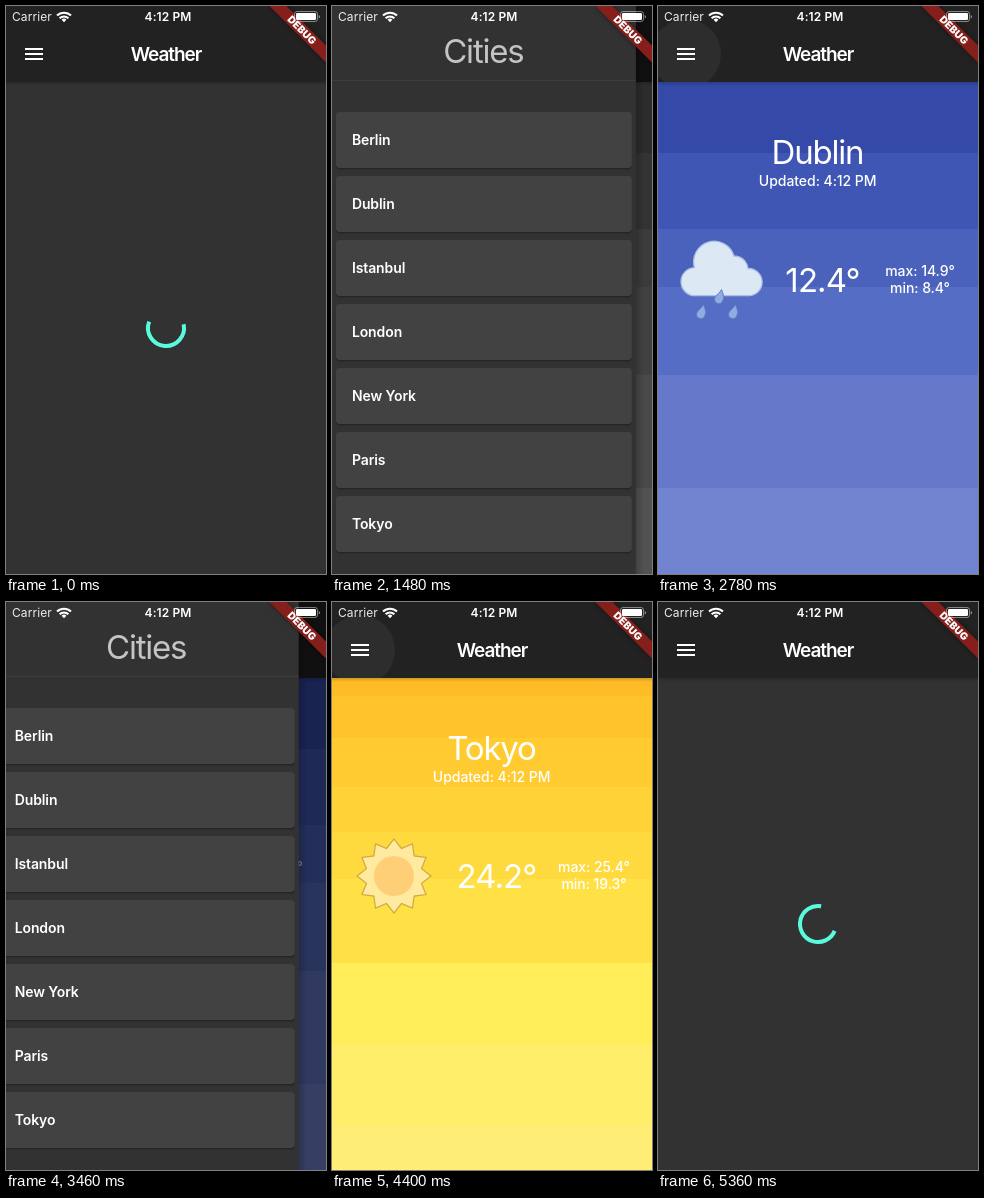
An HTML page that plays this animation: 320 px wide and 568 px high, repeating every 5.38 s.

```html
<!DOCTYPE html>
<html lang="en">
<head>
<meta charset="utf-8">
<title>Weather</title>
<style>
  html, body { margin: 0; width: 100%; height: 100%; overflow: hidden; background: #303030; }
  svg { display: block; width: 100%; height: 100%; }
  text { font-family: Inter, "Liberation Sans", sans-serif; fill: #fff; }
  .mid { text-anchor: middle; }
  .status { font-size: 12px; letter-spacing: .1px; }
  .title { font-size: 19px; font-weight: 600; letter-spacing: -1.05px; }
  .big { font-size: 33px; letter-spacing: -1.2px; }
  .temp { font-size: 33px; letter-spacing: -.9px; }
  .small { font-size: 14px; font-weight: 500; letter-spacing: -.05px; }
  .row { font-size: 14px; font-weight: 600; letter-spacing: -.1px; }
  .debug { font-size: 10.2px; font-weight: 900; }
</style>
</head>
<body>
<svg id="stage" viewBox="0 0 320 568" xmlns="http://www.w3.org/2000/svg">
  <defs>
    <linearGradient id="barShade" x2="0" y2="1">
      <stop stop-color="#000" stop-opacity=".18"/>
      <stop offset="1" stop-color="#000" stop-opacity="0"/>
    </linearGradient>
    <linearGradient id="drawerShade">
      <stop stop-color="#000" stop-opacity=".2"/>
      <stop offset="1" stop-color="#000" stop-opacity="0"/>
    </linearGradient>
    <clipPath id="barClip"><rect width="320" height="76"/></clipPath>
    <filter id="blur" x="-20%" y="-80%" width="140%" height="260%">
      <feGaussianBlur stdDeviation="2.5"/>
    </filter>
  </defs>

  <rect width="320" height="568" fill="#323232"/>
  <g id="views"></g>
  <path id="spinner" fill="none" stroke="#5afade" stroke-width="4"/>

  <rect y="76" width="320" height="4" fill="url(#barShade)"/>
  <rect width="320" height="76" fill="#222"/>
  <circle id="splash" cx="28" cy="48" r="35" fill="#fff" fill-opacity=".05" clip-path="url(#barClip)"/>
  <path d="M19 42h18v2h-18zM19 47h18v2h-18zM19 52h18v2h-18z" fill="#fff"/>
  <text class="title mid" x="160" y="55">Weather</text>

  <rect id="scrim" width="320" height="568"/>
  <g id="drawer">
    <rect x="304" width="8" height="568" fill="url(#drawerShade)"/>
    <rect width="304" height="568" fill="#323232"/>
    <rect y="74" width="304" height="1" fill="#3e3e3e"/>
    <text class="big mid" x="151.5" y="57" style="fill:#c4c4c4">Cities</text>
    <g id="rows"></g>
  </g>

  <g transform="translate(320 0) rotate(45)">
    <rect x="-40" y="28" width="80" height="12" opacity=".4" filter="url(#blur)"/>
    <rect x="-44" y="28" width="88" height="12" fill="#861f1c"/>
    <text class="debug mid" y="37.7">DEBUG</text>
  </g>

  <text class="status" x="6" y="15" style="fill:#ececec">Carrier</text>
  <g fill="none" stroke="#fff" stroke-width="2">
    <path d="M51 9.5a10 10 0 0 1 14 0M53.6 12.3a6.2 6.2 0 0 1 8.8 0"/>
    <path d="M58 16.2l-2.4-2.4a3.4 3.4 0 0 1 4.8 0z" fill="#fff" stroke="none"/>
  </g>
  <text class="status mid" x="162" y="15" style="font-weight:600">4:12 PM</text>
  <rect x="288.5" y="5.5" width="23" height="10" rx="2.5" fill="none" stroke="#fff" stroke-opacity=".45"/>
  <rect x="290" y="7" width="20" height="7" rx="1.2" fill="#fff"/>
  <path d="M312.7 9v3.4q1.4-.5 1.4-1.7t-1.4-1.7z" fill="#fff" opacity=".5"/>
</svg>

<script>
const LOOP = 5380, STEP = 20;
const DRAWER_W = 304;
const $ = id => document.getElementById(id);

const cities = ["Berlin", "Dublin", "Istanbul", "London", "New York", "Paris", "Tokyo"];

const cloud = `<path d="M37.5 289.7A14 14 0 0 1 36.5 261.7A20.3 20.3 0 0 1 76 250
  A14 14 0 0 1 90 262.5A13.6 13.6 0 0 1 91 289.7Z" fill="#dde8f5" stroke="#abc1e3" stroke-width="1.3"/>`;

const drop = (x, y) => `<path transform="translate(${x} ${y})" fill="#8fabe2" stroke="#5b7cc4"
  d="M2.5-7C5-1 5 2 4 3.6A4.3 4.3 0 1 1-3.4 0C-2-2 1-4 2.5-7Z"/>`;

function sun() {
  const spikes = 12;
  const points = Array.from({ length: spikes * 2 }, (_, i) => {
    const a = i * Math.PI / spikes, r = i % 2 ? 28.5 : 37;
    return `${(62 + r * Math.sin(a)).toFixed(2)},${(274 - r * Math.cos(a)).toFixed(2)}`;
  });
  return `<polygon points="${points.join(" ")}" fill="#ffeaa0" stroke="#cfa843" stroke-width="1.2"/>
    <circle cx="62" cy="274" r="20" fill="#ffcf78"/>`;
}

// Bands are [top, colour]; each runs down to the next one.
const reports = [
  {
    from: 380, to: 1600, city: "London", temp: "11.6°", max: "13.2°", min: "8.1°", icon: cloud,
    bands: [[76, "#616161"], [147, "#707070"], [223, "#808080"], [281, "#8f8f8f"],
            [369, "#a0a0a0"], [482, "#b4b4b4"]]
  },
  {
    from: 2380, to: 3540, city: "Dublin", temp: "12.4°", max: "14.9°", min: "8.4°",
    icon: cloud + drop(61, 290.5) + drop(43, 305.5) + drop(75, 305.5),
    bands: [[76, "#3449a8"], [147, "#4056b4"], [223, "#4a62bc"], [281, "#556dc4"],
            [369, "#6578ca"], [482, "#7284cf"]]
  },
  {
    from: 4000, to: 5115, city: "Tokyo", temp: "24.2°", max: "25.4°", min: "19.3°", icon: sun(),
    bands: [[76, "#ffbc26"], [94, "#ffc42b"], [136, "#ffcb31"], [185, "#ffd338"],
            [230, "#ffda3e"], [277, "#ffe045"], [361, "#ffee58"],
            [442, "#ffee69"], [523, "#ffee76"]]
  }
];

const drawers = [
  { from: 1480, open: 1250, close: 1600 },
  { from: 3380, open: 3346, close: 3540 },
  { from: 5000, open: 4974, close: 5115 }
];
const presses = [[2780, 3540], [4400, 5115]];
const spins = [[-170, 380], [1600, 2380], [3540, 4000], [5115, LOOP]];

const label = (cls, x, y, s) => `<text class="${cls} mid" x="${x}" y="${y}">${s}</text>`;

$("views").innerHTML = reports.map(r => {
  const bands = r.bands.map(([y, c]) =>
    `<rect y="${y}" width="320" height="${568 - y}" fill="${c}" shape-rendering="crispEdges"/>`);
  return `<g>${bands.join("")}${r.icon}
    ${label("big", 159.5, 158, r.city)}
    ${label("small", 159.7, 180, "Updated: 4:12 PM")}
    ${label("temp", 164.5, 285.5, r.temp)}
    ${label("small", 262, 270, "max: " + r.max)}
    ${label("small", 262, 287, "min: " + r.min)}</g>`;
}).join("");
const views = [...$("views").children];

$("rows").innerHTML = cities.map((name, i) => {
  const y = 106 + 64 * i;
  return `<rect x="4" y="${y + 1.5}" width="296" height="56" rx="4" fill="#262626"/>
    <rect x="4" y="${y}" width="296" height="56" rx="4" fill="#424242"/>
    <text class="row" x="20" y="${y + 33}">${name}</text>`;
}).join("");

const show = (el, on) => el.setAttribute("visibility", on ? "visible" : "hidden");
const within = (t, [a, b]) => t >= a && t < b;
const clamp = x => Math.min(1, Math.max(0, x));

// Critically damped spring from 0 to 1.
function spring(ms) {
  const a = .0447 * Math.max(0, ms);
  return 1 - (1 + a) * Math.exp(-a);
}

// cubic-bezier(.4, 0, .2, 1)
function ease(x) {
  let lo = 0, hi = 1;
  for (let i = 0; i < 24; i++) {
    const s = (lo + hi) / 2, q = 1 - s;
    if (1.2 * q * q * s + .6 * q * s * s + s * s * s < x) lo = s; else hi = s;
  }
  return 3 * (1 - lo) * lo * lo + lo ** 3;
}

function arc(ms) {
  const cycle = ms * 2 / 1333, step = Math.floor(cycle), u = cycle - step;
  const head = ease(clamp(u * 2)), tail = ease(clamp(u * 2 - 1));
  const a = Math.PI * (-.5 + 1.5 * tail + 1.7 * u - .8 * step);
  const sweep = Math.max(1.5 * Math.PI * (head - tail), .01);
  const at = b => `${160 + 18 * Math.cos(b)} ${322 + 18 * Math.sin(b)}`;
  return `M${at(a)}A18 18 0 ${sweep > Math.PI ? 1 : 0} 1 ${at(a + sweep)}`;
}

function drawerAt(t) {
  const d = drawers.filter(d => t >= d.from).pop();
  return d ? spring(Math.min(t, d.close) - d.open) * (1 - spring(t - d.close)) : 0;
}

function draw(t) {
  reports.forEach((r, i) => show(views[i], within(t, [r.from, r.to])));

  const spin = spins.find(s => within(t, s));
  show($("spinner"), spin);
  if (spin) $("spinner").setAttribute("d", arc(t - spin[0]));

  show($("splash"), presses.some(p => within(t, p)));

  const open = drawerAt(t);
  show($("drawer"), open > .002);
  $("drawer").setAttribute("transform", `translate(${(open - 1) * DRAWER_W} 0)`);
  $("scrim").setAttribute("opacity", .54 * open);
}

const start = performance.now();
function tick() {
  const t = (performance.now() - start) % LOOP;
  draw(Math.floor(t / STEP) * STEP);
  requestAnimationFrame(tick);
}
tick();
</script>
</body>
</html>
```
